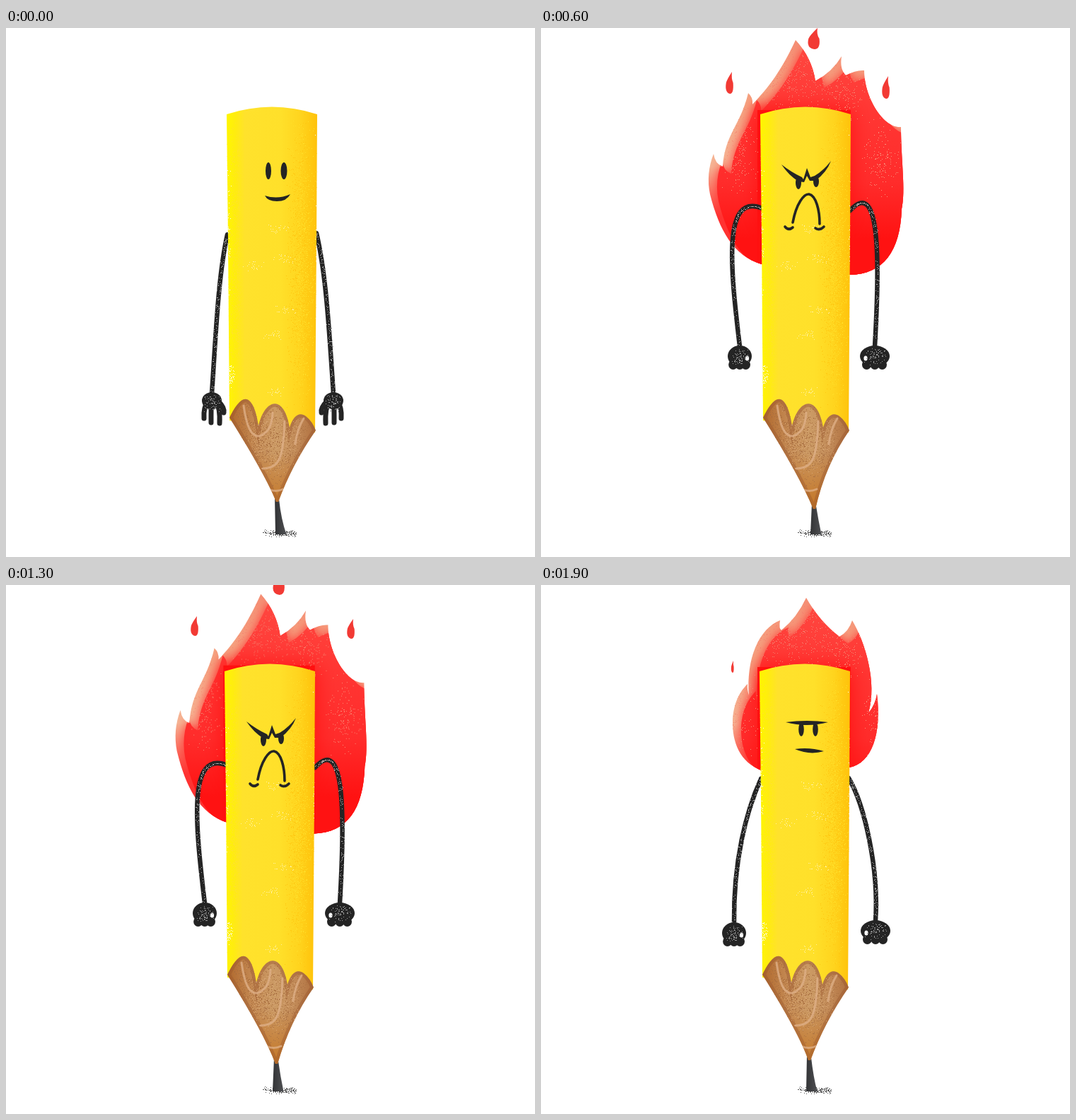
These frames come from a looping animation (748x748 px, 2 s). An HTML page with a canvas:

```html
<!DOCTYPE html>
<html lang="en">
<head>
<meta charset="utf-8">
<title>Pencil losing its temper</title>
<style>
html, body { margin: 0; width: 100%; height: 100%; overflow: hidden; background: #fff; }
canvas { display: block; width: 100vw; height: 100vh; }
</style>
</head>
<body>
<canvas id="stage" width="748" height="748"></canvas>
<script>
const ctx = document.getElementById('stage').getContext('2d');
const INK = '#242424';

let seed = 1;
const random = () => (seed = seed * 16807 % 2147483647) / 2147483647;
const spread = () => random() + random() - 1;

const oval = (x, y, rx, ry) =>
  `M${x - rx} ${y}a${rx} ${ry} 0 1 1 ${2 * rx} 0a${rx} ${ry} 0 1 1 ${-2 * rx} 0Z`;
const drop = (x, y, w, h) =>
  `M${x} ${y}q${-w * .1} ${h * .3} ${w * .15} ${h * .5}q${w * .1} ${h * .5} ${-w * .4} ${h * .5}
    q${-w * .7} ${-h * .05} ${-w * .5} ${-h * .5}q${w * .1} ${-h * .15} ${w * .75} ${-h * .5}Z`;

const flames = {
  small: `M311 262C282 250 270 224 271 190C273 162 284 148 292 140Q291 147 294 156
    C290 104 308 62 338 50Q336 62 340 64Q362 46 375 18Q394 52 422 73Q435 66 440 50
    C458 80 476 138 463 181Q473 169 475 154C482 210 468 252 436 258Z`,
  medium: `M310 298C262 286 254 244 249 205Q249 178 257 160Q258 180 269 183
    C280 164 268 140 279 116C288 96 310 82 308 57Q321 62 315 83C332 66 324 36 345 1
    Q348 18 367 34Q381 50 379 70Q402 56 408 30Q406 48 417 61Q428 72 428 84Q437 80 436 68
    C458 88 453 104 449 122Q448 154 452 170C462 160 474 172 479 155Q480 142 470 137
    Q496 136 498 168C497 244 500 294 434 305Z`,
  large: `M312 334C272 322 252 286 239 235Q233 206 244 178Q246 192 257 196
    C260 150 282 138 293 92Q300 98 299 108C322 84 340 60 360 17Q383 42 388 75
    Q412 62 425 40Q422 58 431 67Q446 59 457 60C457 98 484 142 509 140
    C509 186 516 230 510 256C508 316 484 348 437 349Z`
};

const faces = {
  calm: {
    fill: oval(371, 202, 4, 12) + oval(393, 202, 4.5, 12) +
      'M366 237Q384 243 402 235Q397 245 383 245Q370 245 366 237Z'
  },
  grim: {
    fill: oval(368, 204, 3.8, 10) + oval(388, 204, 3.8, 10) +
      'M346 194Q376 190 406 194Q376 202 346 194ZM359 232Q380 229 400 235Q380 241 359 232Z'
  },
  angry: {
    fill: oval(365, 211, 4, 9) + oval(385, 208, 4, 9) +
      'M337 182Q352 193 370 202L366 206Q348 197 337 182ZM407 177Q395 193 386 201L378 203Q371 192 378 187Q376 196 382 196Q394 189 407 177Z',
    line: 'M349 264C358 212 386 208 395 273M340 270Q343 276 350 273M388 276Q394 281 400 274'
  },
  furious: {
    fill: oval(364, 219, 4, 9) + oval(389, 217, 4, 8) +
      'M340 193Q354 204 369 211L371 214L376 198L381 211L387 209Q399 202 410 188Q404 204 388 216L380 216L376 209L372 218L364 217Q350 208 340 193Z',
    line: 'M356 275C361 248 372 234 379 235C389 237 394 258 394 277M345 281Q350 287 356 282M388 283Q394 287 400 281'
  }
};

const calm = {
  dx: 0, tip: [382, 670], lead: 381, face: 'calm', open: true,
  left: [313, 292, 300, 350, 297, 430, 291, 517],
  right: [439, 290, 453, 350, 457, 430, 463, 517]
};
const grim = {
  dx: -3, tip: [378, 672], lead: 375, face: 'grim', flame: 'small', drops: [[272, 107, 4, 17]],
  left: [311, 274, 290, 320, 272, 390, 273, 478],
  right: [435, 273, 457, 310, 478, 400, 473, 475]
};
const angry = {
  dx: -4.5, tip: [376, 672], lead: 371, face: 'angry', flame: 'medium',
  left: [310, 233, 274, 225, 275, 320, 272, 446],
  right: [434, 234, 478, 214, 468, 340, 474, 439]
};
const furious = {
  dx: -2, tip: [385, 680], lead: 381, face: 'furious', flame: 'large',
  drops: [[391, 0, 17, 30], [270, 62, 11, 31], [491, 68, 11, 32]],
  left: [313, 255, 256, 232, 268, 340, 281, 450],
  right: [437, 258, 480, 210, 479, 330, 472, 450]
};

const mean = (a, b) => Array.isArray(a) ? a.map((v, i) => mean(v, b[i])) : (a + b) / 2;
const between = (a, b, rest) => {
  const pose = {};
  for (const key of ['dx', 'tip', 'lead', 'left', 'right']) pose[key] = mean(a[key], b[key]);
  return { ...pose, ...rest };
};
const rising = between(grim, angry, { face: 'angry', flame: 'small', scale: [1.08, 1.1], baseY: 110 });
const swelling = between(angry, furious, { face: 'furious', flame: 'large', scale: [.96, .97], baseY: 180 });
const flare = {
  ...furious, dx: -3, tip: [381, 677], lead: 377, scale: [.98, 1.02], baseY: 230,
  drops: [[391, -16, 17, 30], [270, 44, 11, 28], [491, 48, 11, 28]]
};
const flicker = between(angry, furious, { face: 'furious', flame: 'medium', scale: [1.06, 1.15], baseY: 60 });

const loop = [furious, flare, flicker];
const poses = [calm, grim, rising, angry, swelling, ...loop, ...loop, ...loop,
  furious, swelling, angry, rising, grim];

function speckle(n, color, x, y, w, h) {
  ctx.fillStyle = color;
  while (n--) ctx.fillRect(Math.round(x + spread() * w), Math.round(y + spread() * h), 1, 1);
}

function gradient(x0, y0, x1, y1, ...stops) {
  const g = ctx.createLinearGradient(x0, y0, x1, y1);
  stops.forEach(([at, color]) => g.addColorStop(at, color));
  return g;
}

function fill(path, color) {
  ctx.fillStyle = color;
  ctx.fill(new Path2D(path));
}

function stroke(path, color, width) {
  ctx.strokeStyle = color;
  ctx.lineWidth = width;
  ctx.stroke(new Path2D(path));
}

function drawFlame({ flame, scale = [1, 1], baseY = 0, drops = [] }) {
  ctx.save();
  ctx.translate(375, baseY);
  ctx.scale(...scale);
  ctx.translate(-375, -baseY);
  const shape = new Path2D(flames[flame]);
  ctx.fillStyle = gradient(0, 0, 0, 280,
    [0, '#f58a72'], [.35, '#f5a582'], [.7, '#f5b595'], [.95, '#ff3030']);
  ctx.fill(shape);
  ctx.clip(shape);
  ctx.save();
  ctx.translate(12, 10);
  ctx.shadowColor = '#ff3835';
  ctx.fillStyle = gradient(0, 0, 0, 320, [0, '#ff4a42'], [.35, '#ff3633'], [.65, '#ff2c2b'], [.9, '#ff1212']);
  ctx.shadowBlur = 14;
  ctx.fill(shape);
  ctx.shadowBlur = 0;
  ctx.fillRect(300, 180, 150, 200);
  ctx.restore();
  // Hot rim around the pencil
  ctx.shadowColor = ctx.fillStyle = '#ff1010';
  ctx.shadowBlur = 28;
  ctx.fillRect(306, 116, 132, 300);
  ctx.shadowBlur = 0;
  speckle(450, '#f4806f', 350, 65, 85, 50);
  speckle(200, '#f58a74', 280, 170, 28, 80);
  speckle(150, '#f8907a', 480, 185, 30, 60);
  speckle(150, '#f58a74', 430, 90, 40, 45);
  ctx.restore();
  drops.forEach(d => fill(drop(...d), '#f23a34'));
}

function drawArm(a, side, open) {
  const [x0, y0, x1, y1, x2, y2, x, y] = a;
  stroke(`M${x0} ${y0}C${x1} ${y1} ${x2} ${y2} ${x} ${y}`, INK, 6.5);
  ctx.fillStyle = '#aaa';
  for (let i = 0; i < 150; i++) {
    const t = random(), u = 1 - t;
    const along = k => u * u * u * a[k] + 3 * u * u * t * a[k + 2] + 3 * u * t * t * a[k + 4] + t * t * t * a[k + 6];
    ctx.fillRect(Math.round(along(0) + spread() * 4), Math.round(along(1)), 1, 1);
  }
  if (open) {
    fill(oval(x, y + 10, 14, 12), INK);
    [[-11, 35], [-1, 41], [11, 42], [17, 27]].forEach(([fx, fy]) =>
      stroke(`M${x + fx * side * .5} ${y + 10}Q${x + fx * side * 1.1} ${y + 20} ${x + fx * side} ${y + fy}`, INK, 7));
    speckle(70, '#999', x, y + 13, 12, 15);
    return;
  }
  const w = side > 0 ? 17 : 21, cy = y + 16;
  fill(oval(x, cy - 2, w, 15), INK);
  [-.55, 0, .5].forEach(k => fill(oval(x + k * w, cy + 10, 6.5, 7), INK));
  fill(oval(x + side * w * .62, cy + 1, 2.6, 3.5), '#fff');
  speckle(80, '#999', x, cy - 2, w - 2, 13);
}

function drawPencil({ dx, tip, lead }) {
  const tx = tip[0] - dx, ty = tip[1];
  fill(`M${tip[0] - 2} ${ty - 8}L${lead} 716H${lead + 15.5}Q${tip[0] + 7} 695 ${tip[0] + 4} ${ty - 4}Z`,
    gradient(lead, 0, lead + 14, 0, [0, '#333436'], [1, '#4c4d50']));
  ctx.save();
  ctx.translate(dx, 0);

  ctx.save();
  const body = new Path2D('M312 122Q376 101 440 122L439 300L437 572L316 555L314 300Z');
  ctx.fillStyle = gradient(312, 0, 440, 0,
    [0, '#fff600'], [.1, '#ffec10'], [.2, '#ffe22c'], [.6, '#ffe02a'], [.82, '#ffd41e'], [1, '#ffc20a']);
  ctx.fill(body);
  ctx.clip(body);
  speckle(1200, '#ffe22c', 328, 335, 20, 215);
  speckle(1400, '#ffc60f', 422, 335, 28, 220);
  speckle(900, '#ffe02a', 418, 335, 22, 215);
  [[385, 283], [394, 326], [350, 336], [394, 398], [376, 434], [381, 515]].forEach(([x, y]) =>
    speckle(24, '#fff2a8', x, y, 17, 8));
  speckle(90, '#fff', 316, 492, 8, 20);
  speckle(50, '#fff', 314, 285, 4, 110);
  speckle(40, '#fff', 440, 260, 4, 130);
  ctx.restore();

  ctx.save();
  const wood = new Path2D(`M316 551C325 532 336 518 345 528Q353 536 357 563
    C362 540 374 528 384 532Q396 537 401 565C406 548 415 542 424 549Q433 556 438 569
    Q404 618 ${tx + 3} ${ty}H${tx}Q368 634 316 551Z`);
  ctx.fillStyle = gradient(316, 0, 438, 0, [0, '#b0682c'], [.3, '#c48a54'], [.55, '#cb9a64'], [.8, '#c08856'], [1, '#b0703f']);
  ctx.fill(wood);
  ctx.clip(wood);
  ctx.fillStyle = gradient(0, 600, 0, 675, [0, 'rgba(196,116,40,0)'], [1, '#c47828']);
  ctx.fillRect(310, 600, 135, 80);
  ctx.strokeStyle = 'rgba(150,84,44,.4)';
  ctx.lineWidth = 9;
  ctx.stroke(wood);
  speckle(600, '#a66b3d', 350, 575, 45, 70);
  speckle(500, '#a97042', 395, 590, 45, 70);
  speckle(400, '#d6a574', 378, 585, 40, 45);
  stroke('M336 534C340 562 346 578 358 577Q376 572 377 544M394 556C392 606 388 622 363 623M409 588Q412 566 421 552M371 652Q381 657 392 652',
    'rgba(225,178,138,.75)', 3);
  ctx.restore();
  ctx.restore();
}

function drawFace({ face }) {
  const { fill: solid, line } = faces[face];
  fill(solid, INK);
  if (line) stroke(line, INK, 3.6);
}

function draw(pose) {
  seed = 7;
  ctx.fillStyle = '#fff';
  ctx.fillRect(0, 0, 748, 748);
  ctx.lineCap = 'round';
  speckle(190, '#555', 388, 714, 27, 5);
  if (pose.flame) drawFlame(pose);
  drawArm(pose.left, 1, pose.open);
  drawArm(pose.right, -1, pose.open);
  seed = 99;
  drawPencil(pose);
  drawFace(pose);
}

let shown = null;
function tick() {
  const step = Math.floor(performance.now() % 2000 / 100);
  const pose = poses[Math.max(0, step - 1)];
  if (pose !== shown) draw(shown = pose);
  requestAnimationFrame(tick);
}
tick();
</script>
</body>
</html>
```
